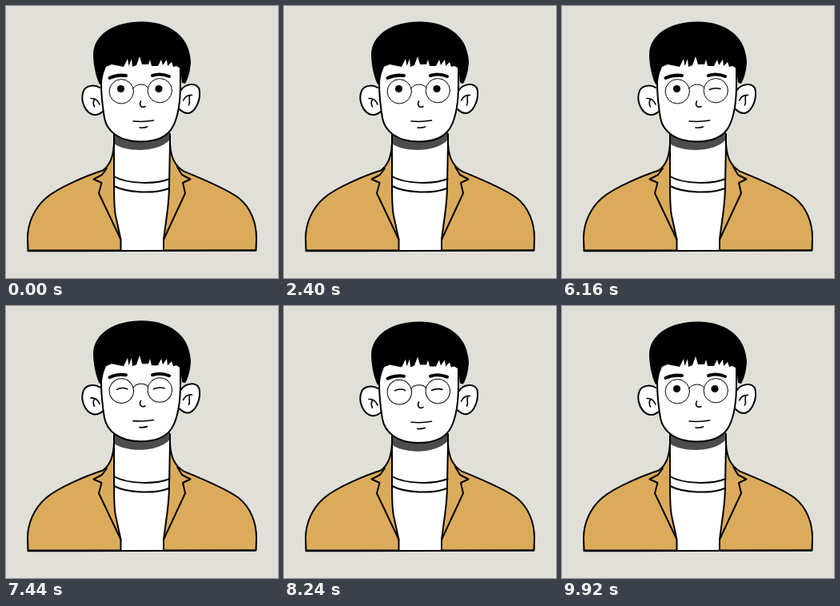
Animation of 340x340 px, one loop 10 s. Source, as an HTML page:

```html
<!DOCTYPE html>
<html lang="en">
<head>
<meta charset="utf-8">
<title>Portrait</title>
<style>
  html, body { margin: 0; width: 100%; height: 100%; overflow: hidden; background: #e0e0d8; }
  svg { display: block; width: 100vw; height: 100vh; }
  .line { fill: none; stroke: #000; stroke-width: 2; stroke-linecap: round; stroke-linejoin: round; }
  .skin { fill: #fff; }
  .coat { fill: #dbab5b; }
  .thin { stroke-width: 1; }
  .fine { stroke-width: 1.6; }
  .brow { stroke-width: 4; }
</style>
</head>
<body>
<svg viewBox="0 0 340 340">
  <g id="body">
    <path class="skin" d="M135 150V252L143 305H197L204 225L205 150Z"/>
    <path class="line coat" d="M135 172C134 187 131 198 121 205.500C104 211 66 226 50 240C35 253 27 272 27 290L27.500 305.500H143.500V292L137 262C135 253 135 240 135 222Z"/>
    <path class="line coat" d="M205 172C206 188 210 199 222 206.500C238 213 275 228 291 240C306 252 313 271 313 290L312.500 305.500H197V292L201 262C203 248 204 235 204 222Z"/>
    <path class="line" d="M126 203L120 211L109.500 216.500L119.500 221L116 234L143.500 292M214 201L220 211L230.500 216.500L221 221L224 234L197 292"/>
    <path class="line" d="M135 213C152 223 188 223 204.500 216M135 225C152 234 186 235 203.500 228M27.500 306.200H92L312 305.500"/>
  </g>
  <path id="shade" fill="#4c4c4c" d="M135 155V172C148 182 188 185 205 167V155Z"/>
  <path class="line" d="M135 160V180M205 160V180"/>
  <g id="head">
    <path class="line skin" d="M117 102C111 98 100 99 97 106C92 118 99 134 110 136C115 136.500 119 134 122 131"/>
    <path class="line skin" d="M219 105C224 97 238 95 241.500 104C244 116 238 130 230 133.500C225 135 220 132 217 129"/>
    <path class="line fine" d="M106 115.500C111 115 115 118 117 123M110.500 117C108.500 120 109 123 110.500 126M221.500 118C224 113 228 111 232.500 111.500M229.500 113C228 117 231 119 228.500 124"/>
    <path class="line skin" d="M121 60L119 96C119 108 121 128 123 140C126 156 141 169.500 168 169.500C190 169.500 203 162 209 150C215 138 218 118 218 98V60Z"/>
    <path d="M117 98C112 88 109 72 109 60C110 36 134 19.500 170 19.500C200 19.500 222 34 228 54C230 61 231 66 231 71C230 82 228 90 224 97L220 96L218 78L213 75L209 76L207 70L202 75L201 67L196 74L194 67L190 75L182 75L180 67L178 73L170 73L167 63L163 74L158 76L157 66L153.500 75L152 66L147 76L132 73L125 76L122 84L119 97Z"/>
    <g class="line thin">
      <circle cx="144.300" cy="106.800" r="15.200"/>
      <circle cx="192.300" cy="105.700" r="15.200"/>
      <path d="M159 103C162 97 174 96 177.500 102"/>
    </g>
    <path class="line fine" d="M168.500 119C166 124 169 128 174 125.500M159 144Q172 145.300 184.500 143M167 152Q172 152.700 176.500 151"/>
    <ellipse id="eyeL" cx="143.500" cy="103.500" rx="4.600" ry="4.600"/>
    <ellipse id="eyeR" cx="191" cy="103.500" rx="4.600" ry="4.600"/>
    <path id="lidL" class="line fine" d="M138.500 105Q145 101.500 151.500 104.500"/>
    <path id="lidR" class="line fine" d="M184.500 104.500Q191 101.500 198 103.500"/>
    <path id="browL" class="line brow"/>
    <path id="browR" class="line brow"/>
  </g>
</svg>
<script>
  const LOOP = 10000, STEP = 80, PIVOT = 95;
  const $ = id => document.getElementById(id);

  // Tables of [time, value]
  const tracks = {
    frown: [[2800, 0], [3760, 1], [4240, 1], [4640, 1.1], [5040, 1], [5120, 1], [5760, 0]],
    wink: [[5840, 0], [6000, 1], [6400, 1], [6560, 0]],
    blink: [[7120, 0], [7280, 1], [8720, 1], [8880, 0]],
    nod: [[7120, 0], [7520, -0.8], [7840, 0], [8240, 0.8], [8640, 0]],
    stretch: [[7120, 0], [7680, 0.01], [8240, 0.01], [8640, 0]]
  };

  const rest = { L: [129.5, 90, 139, 85.5, 150, 87], R: [183, 87, 193, 83.5, 204, 88] };
  const angry = { L: [129.5, 90, 140, 88, 152, 93], R: [183, 92.5, 194, 85, 205, 87.5] };

  const ease = p => p * p * (3 - 2 * p);

  function at(track, t) {
    const i = track.findIndex(k => k[0] > t);
    if (i === 0) return track[0][1];
    if (i < 0) return track[track.length - 1][1];
    const [t0, a] = track[i - 1], [t1, b] = track[i];
    return a + (b - a) * ease((t - t0) / (t1 - t0));
  }

  function setEye(side, shut) {
    $('eye' + side).setAttribute('ry', 4.6 * (1 - shut));
    $('lid' + side).style.opacity = shut > 0.6 ? 1 : 0;
  }

  function setBrow(side, frown) {
    const p = rest[side].map((v, i) => v + (angry[side][i] - v) * frown);
    $('brow' + side).setAttribute('d', `M${p[0]} ${p[1]}Q${p.slice(2)}`);
  }

  function draw(t) {
    const frown = at(tracks.frown, t), blink = at(tracks.blink, t);
    setBrow('L', frown);
    setBrow('R', frown);
    setEye('L', blink);
    setEye('R', Math.max(blink, at(tracks.wink, t)));

    const scale = 1 + at(tracks.stretch, t);
    const shift = at(tracks.nod, t) + PIVOT * (1 - scale);
    for (const id of ['head', 'shade'])
      $(id).setAttribute('transform', `matrix(1 0 0 ${scale} 0 ${shift})`);
  }

  const start = performance.now();
  function tick() {
    const t = (performance.now() - start) % LOOP;
    draw(Math.floor(t / STEP) * STEP);
    requestAnimationFrame(tick);
  }
  tick();
</script>
</body>
</html>
```
